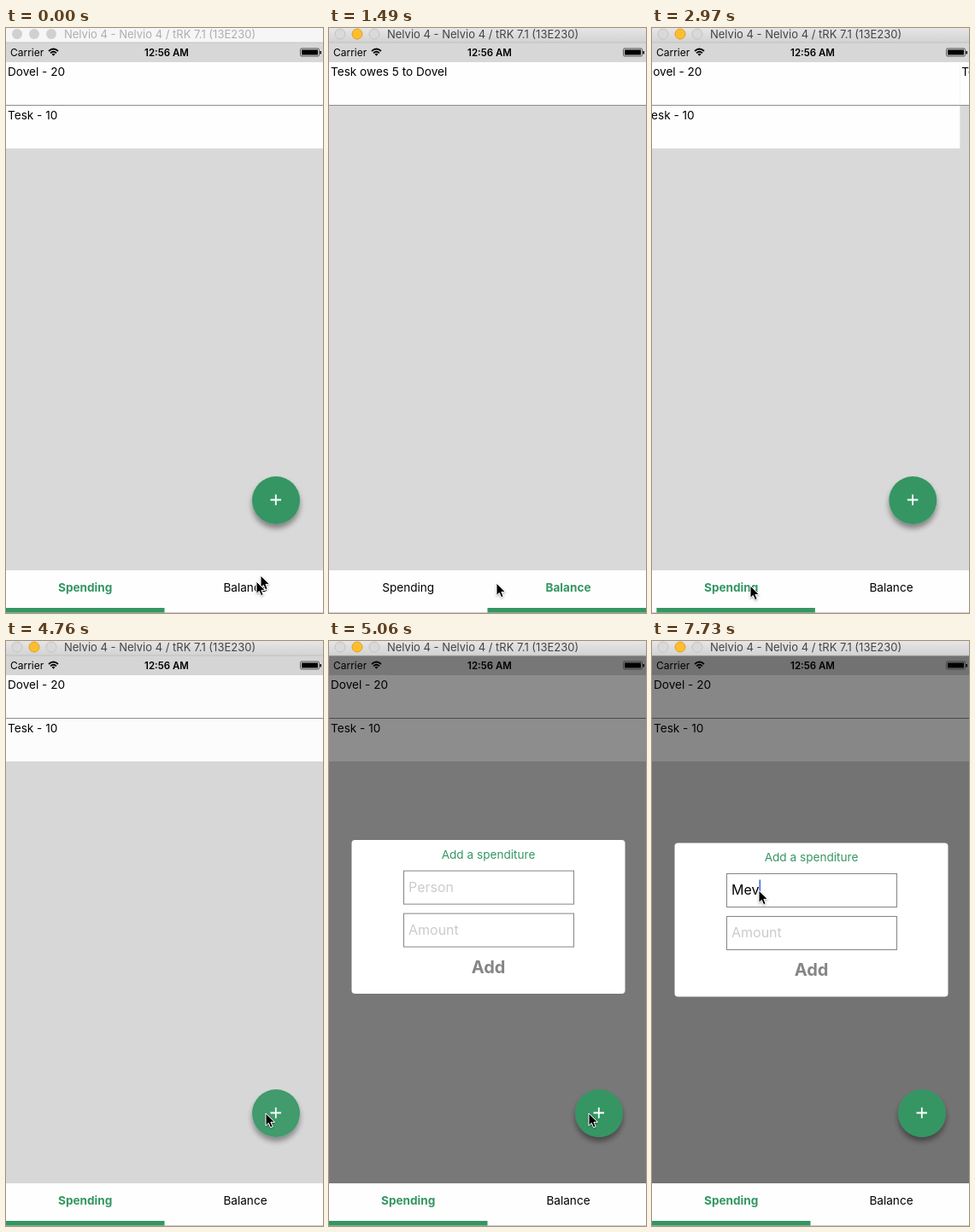
An HTML page that plays this animation: 371x685 px, repeating every 8000 ms.

```html
<!DOCTYPE html>
<html lang="en">
<head>
<meta charset="utf-8">
<title>Spending tracker</title>
<style>
  html, body { margin: 0; width: 100%; height: 100%; overflow: hidden; }
  svg { display: block; width: 371px; height: 685px; font: 13.6px Inter, "Open Sans", sans-serif; }
  .green { fill: #349663; }
  .mid { text-anchor: middle; }
  .tab.on { fill: #349663; font-weight: 700; }
  .field { fill: #fff; stroke: #858585; }
  .hint { font-size: 16px; fill: #cbcbcf; }
  .light { fill: #d0d0d0; }
  .active .light { fill: #d9d9d9; stroke: #c3c3c3; }
  .active .amber { fill: #fdbd2e; stroke: #dfa023; }
  #windowTitle { font-size: 13px; fill: #aeaeae; }
  .active #windowTitle { fill: #444; }
  #titleBg { fill: #f6f6f6; }
  .active #titleBg { fill: url(#chrome); }
</style>
</head>
<body>
<svg viewBox="0 0 371 685">
  <defs>
    <linearGradient id="chrome" x2="0" y2="1">
      <stop stop-color="#e6e6e6"/><stop offset="1" stop-color="#d2d2d2"/>
    </linearGradient>
    <filter id="shadow" x="-30%" y="-30%" width="160%" height="170%">
      <feDropShadow dx="0" dy="5" stdDeviation="3" flood-opacity=".4"/>
    </filter>
    <filter id="soft" x="-50%" y="-50%" width="200%" height="200%">
      <feDropShadow dx="0" dy="1" stdDeviation="1" flood-opacity=".35"/>
    </filter>
    <path id="arrow" d="M0 0V14.5L3.3 11.4 5.6 16.7 8.2 15.6 5.9 10.4H10.5Z" stroke="#fff" filter="url(#soft)"/>
    <clipPath id="screen"><path d="M0 17H371V635H0Z"/></clipPath>
  </defs>

  <rect width="371" height="685" fill="#d9d9d9"/>

  <g clip-path="url(#screen)">
    <g id="pages">
      <path d="M0 40H371V141H0Z" fill="#fefefe"/>
      <path d="M371 40H742V90H371Z" fill="#fefefe"/>
      <path d="M0 90.5H742" stroke="#8c8c8c"/>
      <text x="2" y="56">Dovel - 20</text>
      <text x="2" y="107">Tesk - 10</text>
      <text x="373" y="56">Tesk owes 5 to Dovel</text>
    </g>

    <path d="M0 17H371V40H0Z" fill="#d7d7d7"/>
    <rect id="shade" y="17" width="371" height="618"/>
    <text x="5" y="33" font-size="12">Carrier</text>
    <text x="188" y="32.5" class="mid" font-size="11.5" font-weight="600">12:56 AM</text>
    <g fill="none" stroke="#000" stroke-width="1.7">
      <path d="M50 27Q55.5 22 61 27M52 29.3Q55.5 26.2 59 29.3"/>
      <path d="M53.5 30.5Q55.5 29 57.5 30.5L55.5 32.8Z" fill="#000" stroke="none"/>
    </g>
    <rect x="344.5" y="24" width="22" height="9" rx="1.5" fill="none" stroke="#333" stroke-width=".8"/>
    <path d="M346 25.4H365V31.6H346ZM367.5 27H369V30.5H367.5Z"/>

    <g id="fab">
      <circle cx="316" cy="553" r="28" class="green" filter="url(#shadow)"/>
      <path d="M309.5 552.5H322M315.8 546.3V558.8" stroke="#fff" stroke-width="1.8"/>
    </g>

    <g id="dialog">
      <rect x="26.5" y=".5" width="320" height="180" rx="4" fill="#fff"/>
      <text x="186.5" y="22" class="green mid">Add a spenditure</text>
      <rect x="87.5" y="36.5" width="199" height="39" class="field"/>
      <rect x="87.5" y="86.5" width="199" height="39" class="field"/>
      <text id="person" x="93" y="61" class="hint"></text>
      <text x="93" y="111" class="hint">Amount</text>
      <rect id="caret" y="43.5" width="1.6" height="22" fill="#4269e0"/>
      <text x="186.5" y="156" class="mid" font-size="20" font-weight="700" fill="#858585">Add</text>
    </g>
  </g>

  <g id="titleBar">
    <rect id="titleBg" width="371" height="17"/>
    <path d="M0 17H371" stroke="#bbb" stroke-width=".8"/>
    <circle cx="13" cy="7" r="6" class="light"/>
    <circle cx="33" cy="7" r="6" class="light amber"/>
    <circle cx="53" cy="7" r="6" class="light"/>
    <text id="windowTitle" x="68" y="12">Nelvio 4 - Nelvio 4 / tRK 7.1 (13E230)</text>
  </g>

  <path d="M0 635H371V685H0Z" fill="#fefefe"/>
  <path d="M0 684.5H371" stroke="#ccc"/>
  <text id="spendingTab" class="tab mid" x="92.7" y="659.5">Spending</text>
  <text id="balanceTab" class="tab mid" x="280" y="659.5">Balance</text>
  <rect id="underline" y="679" width="185.5" height="5.5" class="green"/>

  <use id="trail" href="#arrow" x="298" y="641"/>
  <use id="pointer" href="#arrow"/>
</svg>
<script>
const LOOP = 8000, STEP = 148.6;
const SLIDE = 400, TO_BALANCE = 760, TO_SPENDING = 2620, OPEN = 4715;
const $ = id => document.getElementById(id);

// time, x, y
const pointerPath = [
  [0, 293, 648], [148, 290, 652], [1040, 290, 652], [1486, 196, 650],
  [1635, 190, 650], [1932, 162, 651], [2229, 162, 651], [2526, 115, 653],
  [3120, 115, 653], [3270, 126, 651], [4012, 304, 553], [5150, 304, 553],
  [5795, 130, 287], [5944, 125, 292], [LOOP, 125, 292]
];

const progress = (t, start) => t < start ? 0 : Math.min(1, (t - start) / SLIDE);
const easeInOut = p => p < .5 ? 2 * p * p : 1 - 2 * (1 - p) ** 2;
const elastic = p => 1 - Math.cos(p * Math.PI / 2) ** 3 * Math.cos(p * .8 * Math.PI);
const move = (id, x, y) => $(id).setAttribute('transform', `translate(${x} ${y})`);

function pointerAt(t) {
  const i = pointerPath.findIndex(key => key[0] > t);
  const [t0, x0, y0] = pointerPath[i - 1], [t1, x1, y1] = pointerPath[i];
  const p = (t - t0) / (t1 - t0);
  return [x0 + (x1 - x0) * p, y0 + (y1 - y0) * p];
}

function draw(t) {
  const page = easeInOut(progress(t, TO_BALANCE)) - easeInOut(progress(t, TO_SPENDING));
  const onBalance = t >= TO_BALANCE && t < TO_SPENDING;
  move('pages', -371 * page, 0);
  move('fab', -371 * page, 0);
  move('underline', 185.5 * page, 0);
  $('balanceTab').classList.toggle('on', onBalance);
  $('spendingTab').classList.toggle('on', !onBalance);
  $('titleBar').classList.toggle('active', t > 440);

  const open = progress(t, OPEN);
  $('fab').setAttribute('opacity', open > 0 && open < .2 ? .92 : 1);
  $('shade').setAttribute('opacity', .47 * easeInOut(open));
  move('dialog', 0, 685 - 449 * elastic(open));

  const typed = 'Mev'.slice(0, (t > 7130) + (t > 7280) + (t > 7720));
  const person = $('person');
  person.textContent = typed || 'Person';
  person.style.fill = typed ? '#000' : '';
  $('caret').setAttribute('x', 93 + (typed ? person.getComputedTextLength() : 0));
  $('caret').setAttribute('opacity', t > 6980 ? 1 : 0);

  $('trail').setAttribute('opacity', t < STEP ? 1 : 0);
  move('pointer', ...pointerAt(t));
}

function tick() {
  const t = performance.now() % LOOP;
  draw(Math.floor((t + 5) / STEP) * STEP);
  requestAnimationFrame(tick);
}
tick();
</script>
</body>
</html>
```
